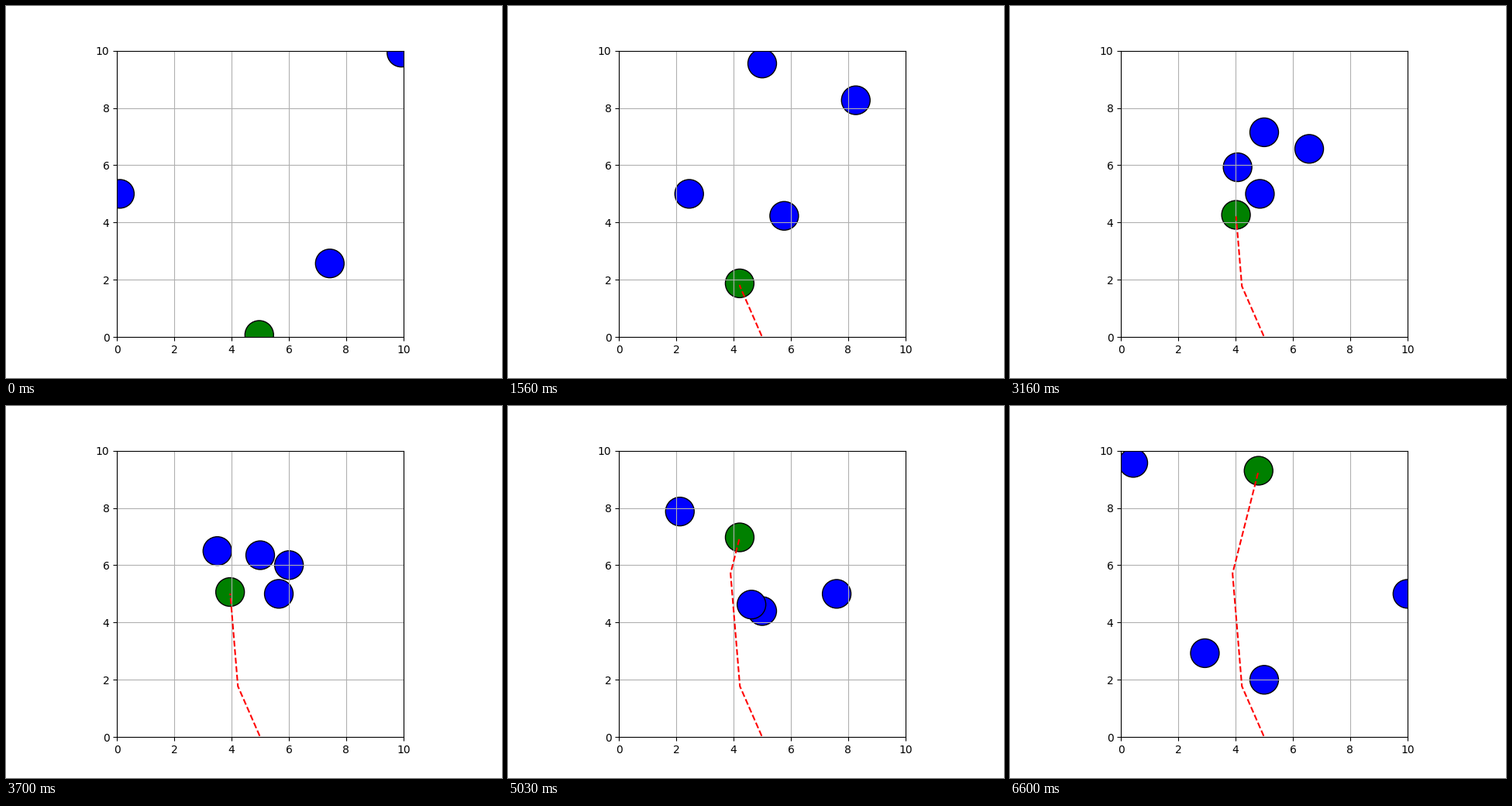
A matplotlib script that plays this animation: 640 by 480 pixels, repeating every 6.64 s.

```python
import numpy as np
import matplotlib.pyplot as plt
from matplotlib.animation import FuncAnimation
from matplotlib.patches import Circle

DT = 0.05          # simulation step, seconds
STEPS = 200
TICK = 20          # ms per animation tick
TICKS = 332
RADIUS = 0.5
DIAG = np.sqrt(0.5)

# start position and unit velocity of each obstacle
OBSTACLES = [
    ((0, 5), (1, 0)),
    ((5, 12), (0, -1)),
    ((10, 10), (-DIAG, -DIAG)),
    ((7.5, 2.5), (-DIAG, DIAG)),
]

# (steps, speed, heading index) for each leg of the robot's route
HEADINGS = np.linspace(0, 2 * np.pi, 20)
LEGS = [(47, 0.825, 6), (79, 1.0, 5), (74, 1.0, 4)]


def straight_path(start, velocity):
    n = np.arange(1, STEPS + 1)[:, None]
    return np.array(start) + n * DT * np.array(velocity)


def robot_path(start):
    moves = []
    for steps, speed, heading in LEGS:
        a = HEADINGS[heading]
        moves += [(speed * np.cos(a), speed * np.sin(a))] * steps
    return np.array(start) + np.cumsum(moves, axis=0) * DT


def add_disc(ax, color):
    return ax.add_patch(Circle((0, 0), RADIUS, facecolor=color, edgecolor="black"))


fig = plt.figure(figsize=(6.4, 4.8), dpi=100)
ax = fig.add_axes([0.125, 0.11, 0.775, 0.77], aspect="equal")
ax.set(xlim=(0, 10), ylim=(0, 10))
ax.grid(True)

robot = robot_path((5, 0))
paths = [robot] + [straight_path(p, v) for p, v in OBSTACLES]
discs = [add_disc(ax, "green")] + [add_disc(ax, "blue") for _ in OBSTACLES]
trail, = ax.plot([], [], "--r")


def update(tick):
    # the simulation runs at 30 steps per second, the ticks at 50
    step = 1 + (3 * tick + 1) // 5
    for disc, path in zip(discs, paths):
        disc.center = path[step]
    trail.set_data(robot[:step, 0], robot[:step, 1])
    return [*discs, trail]


anim = FuncAnimation(fig, update, frames=TICKS, interval=TICK, repeat=True, repeat_delay=0)
plt.show()
```
